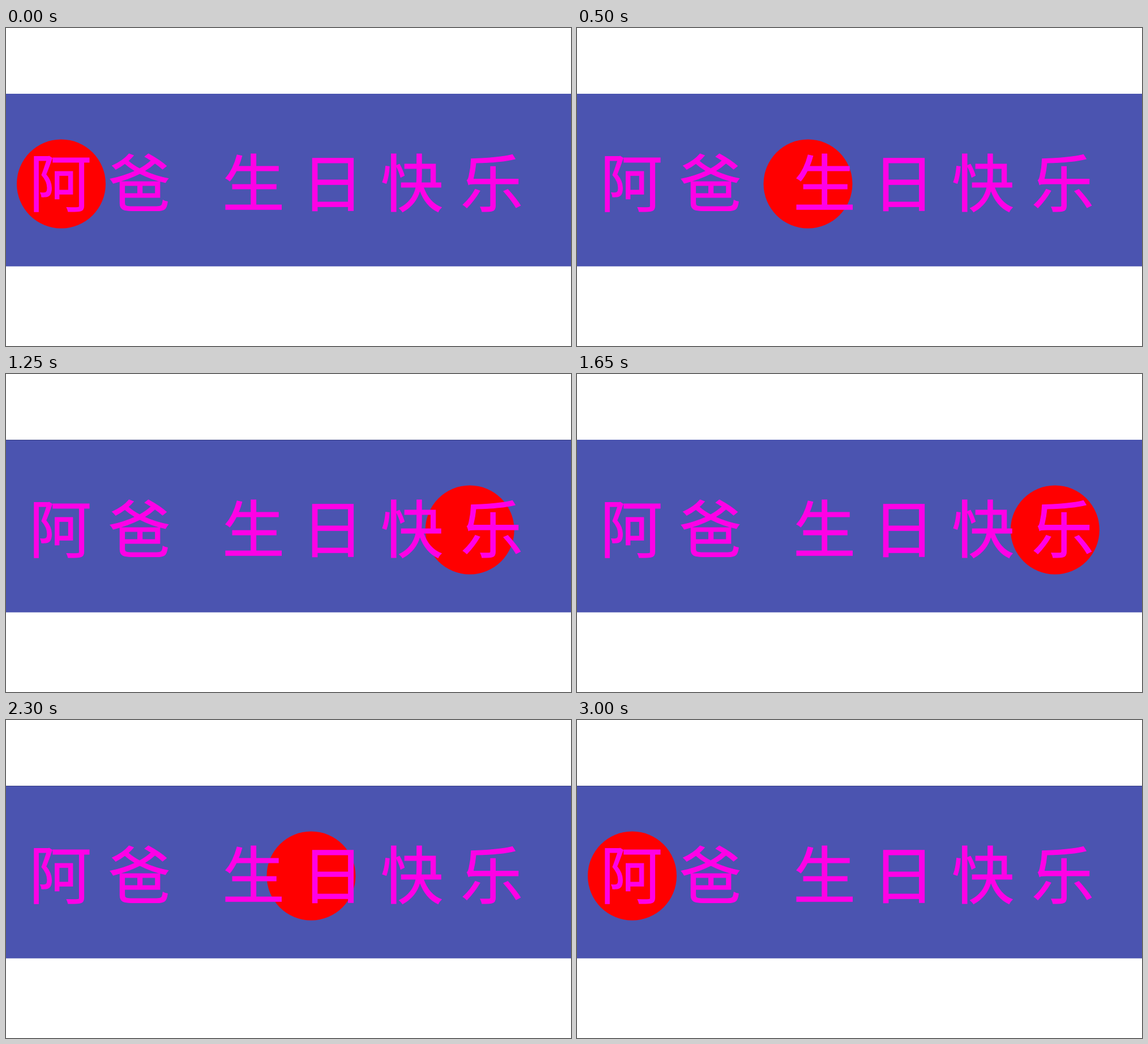
Animation of 998 by 561 pixels, one loop 3.05 s. Source, as an HTML page:

```html
<!DOCTYPE html>
<html lang="zh-CN">
<head>
<meta charset="utf-8">
<title>生日快乐</title>
<style>
  html, body { margin: 0; width: 100%; height: 100%; overflow: hidden; background: #fff; }
  svg { display: block; width: 998px; height: 561px; }
  text {
    font: 400 110px "Noto Sans CJK SC", "Noto Sans CJK JP", "Noto Sans CJK", sans-serif;
    fill: #ff00e6;
    stroke: #ff00e6;
    stroke-width: 1.2px;
  }
</style>
</head>
<body>
<svg viewBox="0 0 998 561">
  <rect y="116" width="998" height="304.5" fill="#4b54b0"/>
  <rect id="edge" y="116" width="998" height="1" fill="#383f84"/>
  <circle id="ball" cx="97.5" cy="275" r="78.5" fill="#f00"/>
  <text x="41 181 321 382 522 662 803" y="315">阿爸 生日快乐</text>
</svg>
<script>
  const LOOP = 3050, STEP = 50, TURN = 1500, START_X = 97.5;
  const ball = document.getElementById('ball');
  const edge = document.getElementById('edge');

  // Speed profile: [time in ms, px per ms], linear between points.
  const speed = [[0, 0], [52, 0.655], [809, 0.655], [1350, 0.21], [TURN, 0]];

  function distance(t) {
    let sum = 0;
    for (let i = 1; i < speed.length; i++) {
      const [t0, v0] = speed[i - 1], [t1, v1] = speed[i];
      const d = Math.min(t, t1) - t0;
      if (d <= 0) break;
      sum += v0 * d + (v1 - v0) * d * d / (2 * (t1 - t0));
    }
    return sum;
  }

  function draw(t) {
    const there = TURN - Math.abs(TURN - t);
    ball.setAttribute('cx', START_X + distance(there));
    const lined = (t >= 600 && t < 1650) || t >= 2250;
    edge.setAttribute('visibility', lined ? 'visible' : 'hidden');
  }

  const begin = performance.now();
  function tick() {
    const t = (performance.now() - begin) % LOOP;
    draw(Math.floor(t / STEP) * STEP);
    requestAnimationFrame(tick);
  }
  draw(0);
  requestAnimationFrame(tick);
</script>
</body>
</html>
```
